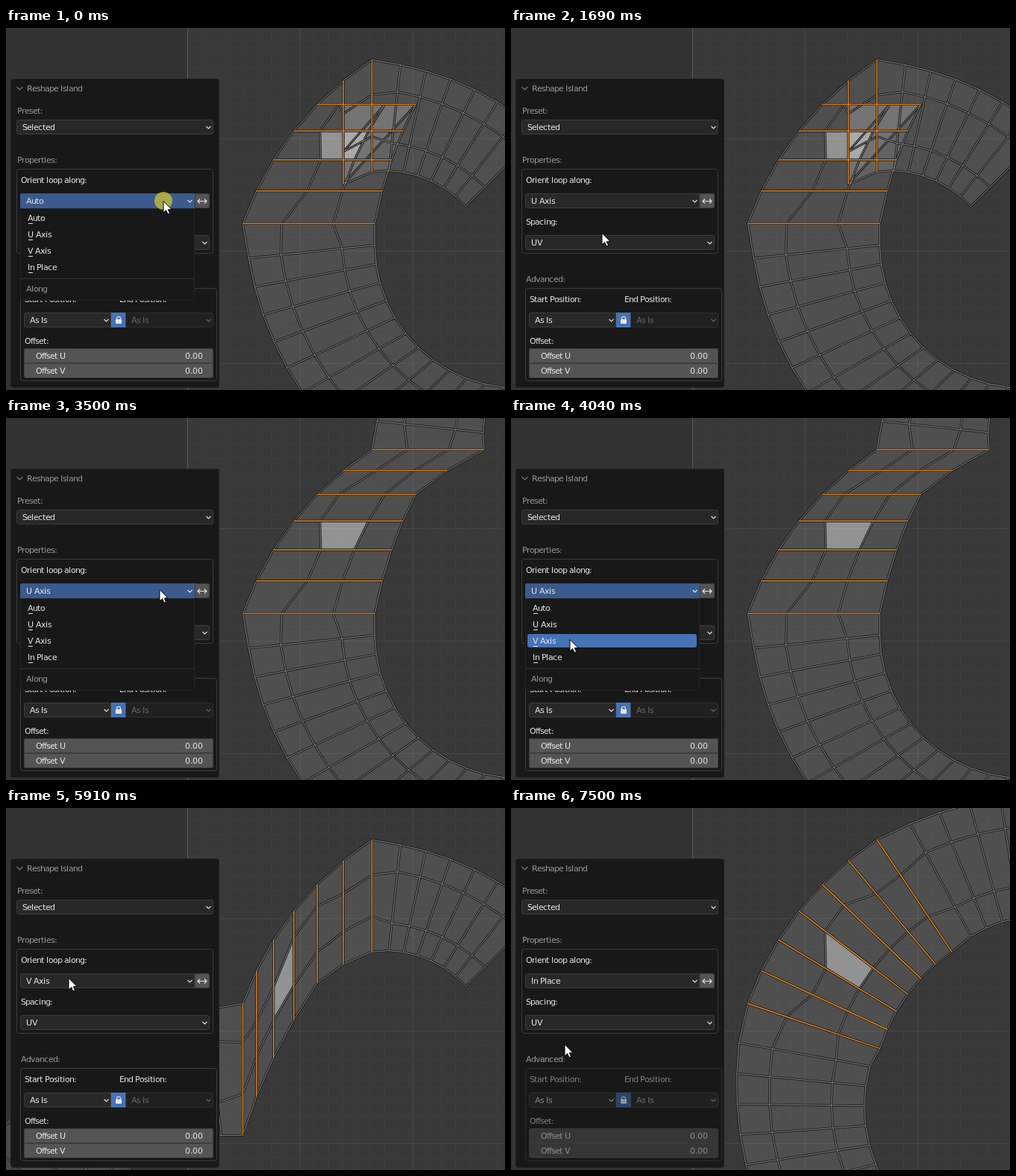
Animation, 669 px wide and 486 px high, one loop 8000 ms. Source, as an HTML page with a canvas:

```html
<!DOCTYPE html>
<html lang="en">
<head>
<meta charset="utf-8">
<title>Reshape Island</title>
<style>
  html, body { margin: 0; width: 669px; height: 486px; overflow: hidden; background: #333; }
  canvas { display: block; }
</style>
</head>
<body>
<canvas id="stage" width="669" height="486"></canvas>
<script>
const ctx = document.getElementById('stage').getContext('2d');
const LOOP = 8000;
const WHITE = '#e6e6e6', GREY = '#989898';
const BLUE = '#4772b3', OPEN_BLUE = '#3b5a8d', PANEL = '#181818', FIELD = '#282828', BORDER = '#3d3d3d';
const MODES = ['Auto', 'U Axis', 'V Axis', 'In Place'];
const radians = degrees => degrees * Math.PI / 180;

// ---- Mesh: a bent strip, each row runs from the outer rim to the inner rim ----

// Angles start at the left of the circle and grow clockwise
const arc = (cx, cy, r, start, step) => k => {
  const a = radians(start + step * k);
  return [cx - r * Math.cos(a), cy - r * Math.sin(a)];
};

const between = ([x0, y0], [x1, y1], f) => [x0 + (x1 - x0) * f, y0 + (y1 - y0) * f];

function strip(first, last, outer, inner, split) {
  const rows = [];
  for (let k = first; k <= last; k++) {
    const a = outer(k), b = inner(k);
    rows.push([0, ...split(k), 1].map(f => between(a, b, f)));
  }
  return rows;
}

// Straightens a row along an axis, keeping its outer end and its spacing
function align(row, axis) {
  const [x, y] = row[0], dx = row[3][0] - x, dy = row[3][1] - y;
  const length = Math.max(Math.abs(dx), Math.abs(dy));
  return row.map(point => {
    const d = (point[0] - x) / dx * length;
    return axis === 'u' ? [x + d, y] : [x, y + d];
  });
}

function turn(rows, degrees, [px, py], [toX, toY] = [px, py], scale = 1) {
  const c = Math.cos(radians(degrees)) * scale, s = Math.sin(radians(degrees)) * scale;
  return rows.map(row => row.map(([x, y]) =>
    [toX + (x - px) * c - (y - py) * s, toY + (x - px) * s + (y - py) * c]));
}

const even = () => [0.255, 0.74];
const WOBBLE = [0.294, 0.405, 0.4, 0.24, 0.22, 0.318, 0.316];

const loops = strip(0, 6, arc(728.6, 407.7, 436.6, 19.5, 6.23), arc(732.7, 399, 250.7, 17.8, 6.27), k => [WOBBLE[k], 0.685]);
const tail = strip(1, 14, arc(768, 236, 449, -4.3, -5), arc(687, 290, 193, 7.3, -7.6), even).reverse();
const head = strip(1, 7, arc(447.5, 455, 414, 96.4, 4.85), arc(507.4, 337.6, 146.6, 84.6, 7.6), even);

const loopsU = loops.map(row => align(row, 'u'));
const loopsV = loops.map(row => align(row, 'v'));
const MESHES = [
  [tail, [...loopsU.slice(0, 5), ...loopsV.slice(5)], head],
  [tail, loopsU, turn(head, -90, [490, 42])],
  [turn(tail, 90, [317, 262]), loopsV, head],
  [turn(tail, 16, [687, 290], [676, 401], 1.05), loops, turn(head, -34.5, [507, 338], [710, 321], 1.2)]
];

function line(points) {
  points.forEach(([x, y], i) => i ? ctx.lineTo(x, y) : ctx.moveTo(x, y));
}

function strokeTwice(inner, width) {
  ctx.lineWidth = 3;
  ctx.strokeStyle = '#1e1e1e';
  ctx.stroke();
  ctx.lineWidth = width;
  ctx.strokeStyle = inner;
  ctx.stroke();
}

function drawMesh([before, selected, after]) {
  const rows = [...before, ...selected, ...after];
  const active = before.length + 2;
  ctx.save();
  ctx.translate(0.5, 0.5);
  ctx.lineJoin = 'round';
  for (let i = 0; i + 1 < rows.length; i++) {
    for (let j = 0; j < 3; j++) {
      const a = rows[i], b = rows[i + 1];
      ctx.fillStyle = `rgba(255,255,255,${i === active && j === 1 ? 0.45 : 0.11})`;
      ctx.beginPath();
      line([a[j], a[j + 1], b[j + 1], b[j]]);
      ctx.fill();
    }
  }
  ctx.beginPath();
  rows.forEach(line);
  for (let j = 0; j < 4; j++) line(rows.map(row => row[j]));
  strokeTwice('#808080', 1);
  ctx.beginPath();
  selected.forEach(line);
  strokeTwice('#e0821c', 1.5);
  ctx.restore();
}

function drawGrid() {
  ctx.fillStyle = '#333';
  ctx.fillRect(0, 0, 669, 486);
  ctx.fillStyle = '#393939';
  ctx.fillRect(243, 0, 426, 486);
  for (let i = -8; i < 24; i++) {
    const step = Math.round(i * 151 / 8);
    ctx.fillStyle = i % 8 ? '#3c3c3c' : '#464646';
    if (i > 0) ctx.fillRect(243 + step, 0, 1, 486);
    ctx.fillRect(243, 148 + step, 426, 1);
  }
  ctx.fillStyle = '#5c5c5c';
  ctx.fillRect(243, 0, 1, 486);
}

// ---- Widgets ----
const advances = {};
function advance(char) {
  if (!(char in advances)) {
    ctx.save();
    ctx.font = '1100px "DejaVu Sans", sans-serif';
    advances[char] = Math.floor(ctx.measureText(char).width / 100 + 0.01);
    ctx.restore();
  }
  return advances[char];
}

// Whole-pixel advances, as the interface toolkit sets its text
function text(string, x, y, color = WHITE) {
  ctx.fillStyle = color;
  for (const char of string) {
    ctx.fillText(char, x, y);
    x += advance(char);
  }
}

function box(x, y, w, h, fill, border, radius = 3) {
  ctx.beginPath();
  ctx.roundRect(x, y, w, h, radius);
  ctx.fillStyle = fill;
  ctx.fill();
  if (!border) return;
  ctx.beginPath();
  ctx.roundRect(x + 0.5, y + 0.5, w - 1, h - 1, radius);
  ctx.strokeStyle = border;
  ctx.lineWidth = 1;
  ctx.stroke();
}

function stroke(color, width, ...lines) {
  ctx.beginPath();
  lines.forEach(line);
  ctx.strokeStyle = color;
  ctx.lineWidth = width;
  ctx.stroke();
}

function chevron(x, y, color = WHITE, size = 3) {
  stroke(color, 1.1, [[x - size, y - size / 2], [x, y + size / 2], [x + size, y - size / 2]]);
}

function dropdown(label, x, y, w, { fill = FIELD, border = BORDER, color = WHITE, radius = 3 } = {}) {
  box(x, y, w, 20, fill, border, radius);
  text(label, x + 8, y + 14, color);
  chevron(x + w - 6.5, y + 10.5, color);
}

function swapButton() {
  box(253, 222, 20, 20, '#545454', BORDER, [0, 3, 3, 0]);
  stroke(WHITE, 1.1, [[257, 232.5], [269, 232.5]],
    [[260, 229.5], [257, 232.5], [260, 235.5]], [[266, 229.5], [269, 232.5], [266, 235.5]]);
}

function lockButton() {
  box(141, 382, 20, 20, BLUE, null, 0);
  box(147, 391, 8, 6, WHITE, null, 1);
  ctx.beginPath();
  ctx.arc(151, 390, 2.5, Math.PI, 0);
  ctx.lineTo(153.5, 392);
  ctx.moveTo(148.5, 390);
  ctx.lineTo(148.5, 392);
  ctx.strokeStyle = WHITE;
  ctx.lineWidth = 1.2;
  ctx.stroke();
}

function slider(label, y, h, radius) {
  box(24, y, 254, h, '#545454', BORDER, radius);
  text(label, 40, y + 14);
  text('0.00', 240, y + 14);
}

function drawAdvanced(enabled) {
  text('Advanced:', 20, 341, GREY);
  ctx.globalAlpha = enabled ? 1 : 0.5;
  box(19, 349, 264, 125, PANEL, BORDER);
  text('Start Position:', 25, 368);
  text('End Position:', 152, 368);
  dropdown('As Is', 24, 382, 117, { radius: [3, 0, 0, 3] });
  lockButton();
  ctx.globalAlpha = 0.5;
  dropdown('As Is', 160, 382, 118, { color: '#b0b0b0', radius: [0, 3, 3, 0] });
  ctx.globalAlpha = enabled ? 1 : 0.5;
  text('Offset:', 25, 424);
  slider('Offset U', 430, 20, [3, 3, 0, 0]);
  slider('Offset V', 450, 20, [0, 0, 3, 3]);
  ctx.globalAlpha = 1;
}

function drawMenu(cursorY) {
  box(19, 242, 234, 124, PANEL, '#242424', [0, 0, 4, 4]);
  const hovered = Math.floor((cursorY - 244) / 22);
  MODES.forEach((name, i) => {
    const y = 246 + 22 * i;
    if (i === hovered) box(22, y, 227, 18, BLUE);
    text(name, 29, y + 13);
    ctx.fillRect(30, y + 16, 6, 1);
  });
  ctx.fillStyle = '#343434';
  ctx.fillRect(20, 336, 232, 1);
  text('Along', 27, 354, GREY);
}

function drawPanel(mode, open, cursorY) {
  ctx.font = '11px "DejaVu Sans", sans-serif';
  box(6, 68, 280, 415, PANEL, '#1f1f1f', 4);
  chevron(18.5, 81, '#7a7a7a', 4);
  text('Reshape Island', 28, 85, GREY);
  text('Preset:', 15, 115, GREY);
  dropdown('Selected', 14, 123, 264);
  text('Properties:', 15, 181, GREY);
  box(14, 189, 264, 114, PANEL, BORDER);
  text('Orient loop along:', 20, 208);
  dropdown(MODES[mode], 19, 222, 234, open
    ? { fill: OPEN_BLUE, border: OPEN_BLUE, radius: [3, 0, 0, 0] }
    : { radius: [3, 0, 0, 3] });
  swapButton();
  text('Spacing:', 20, 264);
  dropdown('UV', 19, 278, 254);
  drawAdvanced(mode !== 3);
  if (open) drawMenu(cursorY);
}

// ---- Pointer ----
// [start, steps of 70 ms, x, y]
const MOVES = [
  [330, 9, 127, 269], [960, 2, 122, 275], [2620, 1, 122, 276], [2820, 6, 206, 230],
  [3760, 5, 79, 297], [5620, 5, 84, 228], [6700, 3, 73, 295], [6910, 2, 72, 317]
];
const CLICKS = [[0, 70], [1360, 1690], [3370, 3500], [4370, 4630], [6170, 6310], [7240, 7430]];
const MENUS = [[0, 1690], [3370, 4630], [6170, 7430]];

const within = (ranges, t) => ranges.some(([from, to]) => t >= from && t < to);
const countPassed = (times, t) => times.filter(time => t >= time).length;

function pointerAt(t) {
  let x = 211, y = 232;
  for (const [start, steps, toX, toY] of MOVES) {
    if (t < start) break;
    const p = Math.min(1, (Math.floor((t - start) / 70) + 1) / steps);
    const eased = p * p * (3 - 2 * p);
    x += (toX - x) * eased;
    y += (toY - y) * eased;
  }
  return [Math.round(x), Math.round(y)];
}

function drawPointer(x, y, pressed) {
  if (pressed) {
    ctx.beginPath();
    ctx.arc(x, y, 12, 0, 2 * Math.PI);
    ctx.fillStyle = 'rgba(198,190,60,.8)';
    ctx.fill();
  }
  ctx.save();
  ctx.translate(x, y + 0.5);
  ctx.beginPath();
  line([[0, 0], [0, 15.5], [3.6, 12.2], [6, 17.5], [8.6, 16.4], [6.3, 11.3], [11.2, 11.2]]);
  ctx.closePath();
  ctx.fillStyle = '#fff';
  ctx.fill();
  ctx.strokeStyle = '#000';
  ctx.lineWidth = 1;
  ctx.stroke();
  ctx.restore();
}

function draw(now) {
  const t = now % LOOP;
  const [x, y] = pointerAt(t);
  drawGrid();
  drawMesh(MESHES[countPassed([1760, 4700, 7500], t)]);
  drawPanel(countPassed([1690, 4630, 7430], t), within(MENUS, t), y);
  drawPointer(x, y, within(CLICKS, t));
}

let began;
function tick(now) {
  began ??= now;
  draw(now - began);
  requestAnimationFrame(tick);
}
requestAnimationFrame(tick);
</script>
</body>
</html>
```
